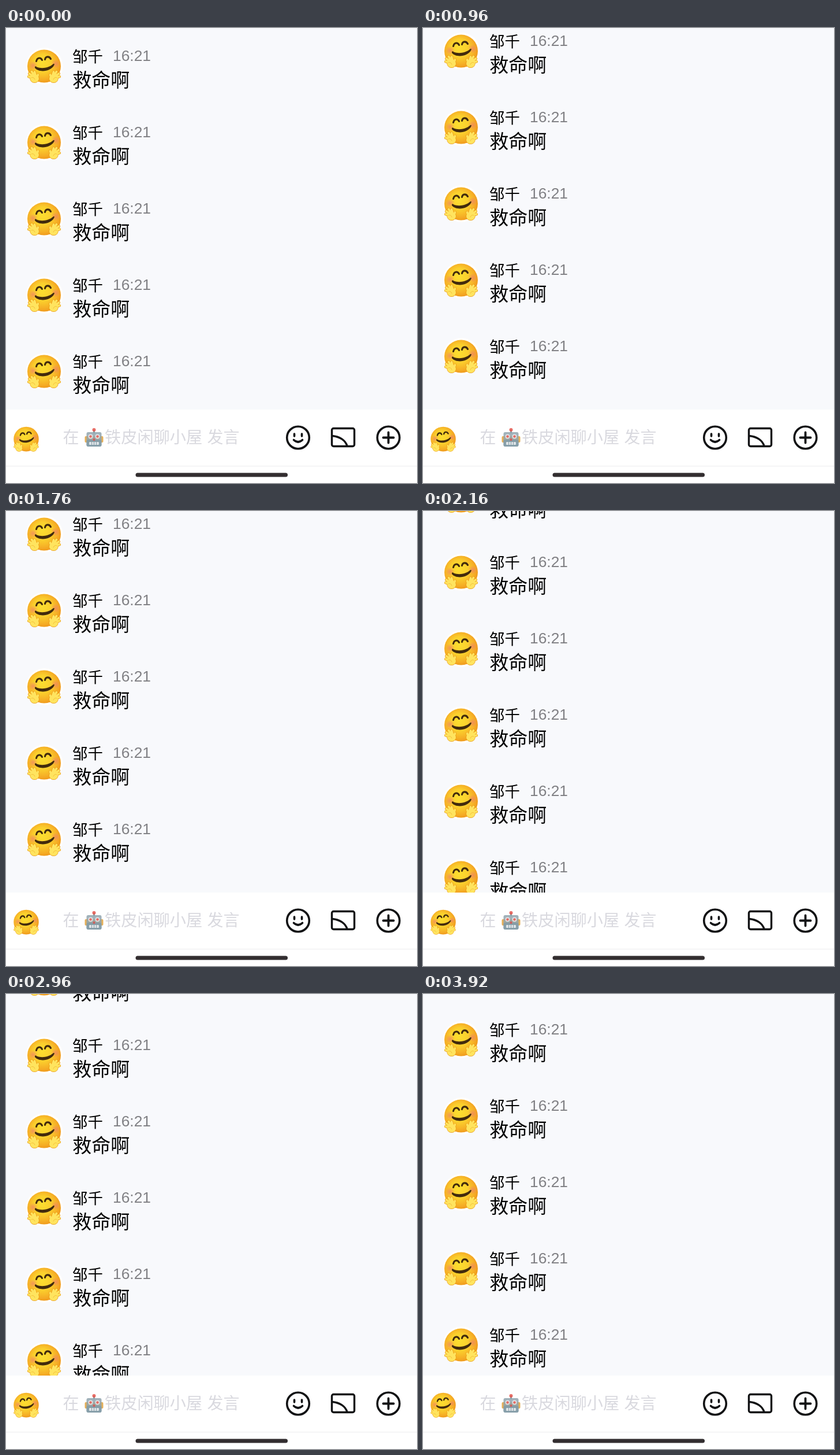
Write an HTML page with a canvas that moves like this. It is 712x787 px and loops after 4000 ms.

```html
<!DOCTYPE html>
<html lang="zh-CN">
<head>
<meta charset="utf-8">
<title>Scrolling chat</title>
<style>
  html, body { margin: 0; width: 100%; height: 100%; overflow: hidden; background: #fff; }
  canvas { display: block; }
</style>
</head>
<body>
<canvas id="stage" width="712" height="787"></canvas>
<script>
const ctx = document.getElementById('stage').getContext('2d');
const CJK = '"Noto Sans CJK SC", "Noto Sans CJK", sans-serif';
const LATIN = '"Liberation Sans", Arial, sans-serif';
const STEP_MS = 80, STEPS_PER_ROW = 10, ROW = 132, CHAT_BOTTOM = 660;
const BROWN = '#422b0d', INK = '#111214';

function text(str, x, y, size, color, family = CJK) {
  ctx.font = `${size}px ${family}`;
  ctx.fillStyle = color;
  ctx.fillText(str, x, y);
}

function disc(x, y, rx, fill, ry = rx) {
  ctx.beginPath();
  ctx.ellipse(x, y, rx, ry, 0, 0, Math.PI * 2);
  ctx.fillStyle = fill;
  ctx.fill();
}

function ring(x, y, r) {
  ctx.beginPath();
  ctx.arc(x, y, r, 0, Math.PI * 2);
  ctx.stroke();
}

function box(x, y, w, h, r, fill) {
  ctx.beginPath();
  ctx.roundRect(x, y, w, h, r);
  ctx.fillStyle = fill;
  ctx.fill();
}

function line(path, color, width) {
  ctx.strokeStyle = color;
  ctx.lineWidth = width;
  ctx.stroke(new Path2D(path));
}

function glow(x, y, r, inner, outer) {
  const g = ctx.createRadialGradient(x, y, 0, x, y, r);
  g.addColorStop(0, inner);
  g.addColorStop(1, outer);
  return g;
}

// Open hand, fingers fanned towards the upper left.
function hand() {
  const fingers = 'M-17 20L-26.5 18M-17 19L-25.5 13M-16 18L-21.5 9.5M-14 18L-16.5 10M-13 21L-10.5 15';
  line(fingers, '#eb9a14', 5);
  disc(-16.5, 21.5, 8.2, '#eb9a14', 7.4);
  line(fingers, '#ffe45f', 3.7);
  disc(-16.5, 21.5, 7.5, '#ffe45f', 6.8);
  line('M-22 20Q-18 18-16 23', '#f2b52f', 0.8);
}

function huggingFace(x, y, scale) {
  ctx.save();
  ctx.translate(x, y);
  ctx.scale(scale, scale);
  ctx.lineCap = ctx.lineJoin = 'round';
  const skin = ctx.createRadialGradient(-4, -8, 0, -2, -2, 31);
  skin.addColorStop(0, '#fddf30');
  skin.addColorStop(0.5, '#fbcf2d');
  skin.addColorStop(0.82, '#f6b026');
  skin.addColorStop(1, '#f09a1d');
  disc(0, 0, 29, skin, 28.5);
  disc(-19, -1, 8, glow(-19, -1, 8, 'rgba(237,119,112,.65)', 'rgba(237,119,112,0)'));
  disc(20, -4, 8, glow(20, -4, 8, 'rgba(237,119,112,.65)', 'rgba(237,119,112,0)'));
  line('M-13.5-8.5C-12-15.5-5.5-15.5-3.5-10.5M1.5-11.5C2.5-17.5 9-17.5 11.5-12.5', BROWN, 3.1);
  ctx.fillStyle = BROWN;
  ctx.fill(new Path2D('M-16 1C-15-.5-13.5 1-12.5 1.5C-4 5 8 3 15.5-3.5C17-5 18.5-4 17.5-2C12 9.5-9 12-16 3Z'));
  hand();
  ctx.scale(-1, 1);
  hand();
  ctx.restore();
}

function robot(x, y) {
  ctx.save();
  ctx.translate(x, y);
  ctx.globalAlpha = 0.85;
  box(-1.5, -14, 3, 6, 0, '#7c8b93');
  disc(0, -14, 3, '#e5574d');
  box(-16, -3, 32, 11, 2, '#e1a13d');
  box(-13, -10, 26, 25, 3, '#90a4ae');
  box(-13, 3, 26, 12, 3, '#829ba7');
  for (const side of [-1, 1]) {
    disc(side * 6, -2.5, 4, '#eceff1');
    disc(side * 6, -2.5, 2.3, '#e5574d');
  }
  box(-1.8, 1, 3.6, 4, 1, '#d9534f');
  box(-8.5, 7, 17, 5, 1, '#eceff1');
  for (let i = -1; i <= 1; i++) box(i * 4 - 0.5, 7, 1, 5, 0, '#78909c');
  ctx.restore();
}

function message(y) {
  disc(66.5, y + 66, 32, '#fff');
  huggingFace(66, y + 66, 1);
  text('邹千', 115, y + 58.5, 26.4, '#000');
  text('16:21', 185, y + 57, 26.4, '#808084', LATIN);
  text('救命啊', 115.3, y + 102, 33, '#000');
}

function inputBar() {
  box(0, CHAT_BOTTOM, 712, 127, 0, '#fff');
  box(0, 757, 712, 1.5, 0, '#f1f1f3');
  huggingFace(35, 711, 0.75);

  const hint = '#d9d9df';
  text('在', 98.5, 718, 28, hint);
  robot(152.5, 709);
  text('铁皮闲聊小屋', 171, 718, 28.2, hint);
  text('发言', 348.5, 718, 28, hint);

  ctx.lineCap = ctx.lineJoin = 'round';
  ctx.strokeStyle = INK;
  ctx.lineWidth = 3.6;
  ring(506, 708.5, 19.3);
  ring(662.5, 708.5, 19.3);
  line('M499.5 702V706M512.5 702V706M498.5 712.5Q506 719.5 513.5 712.5', INK, 3.6);
  line('M653.5 708.5H671.5M662.5 699.5V717.5', INK, 3.8);
  ctx.lineWidth = 3.4;
  ctx.beginPath();
  ctx.roundRect(564.5, 692.5, 39, 31, 3);
  ctx.stroke();
  line('M565 705.5C578 706.5 588 713 591 723', INK, 3.4);

  box(224.5, 769.5, 263.5, 7, 3.5, '#332e30');
}

function draw(now) {
  const step = Math.floor(now / STEP_MS) % STEPS_PER_ROW;
  const shift = Math.round(step * ROW / STEPS_PER_ROW);
  box(0, 0, 712, CHAT_BOTTOM, 0, '#f8f9fc');
  for (let row = 0; row < 6; row++) message(row * ROW - shift);
  inputBar();
}

const start = performance.now();
function tick() {
  draw(performance.now() - start);
  requestAnimationFrame(tick);
}
tick();
</script>
</body>
</html>
```
